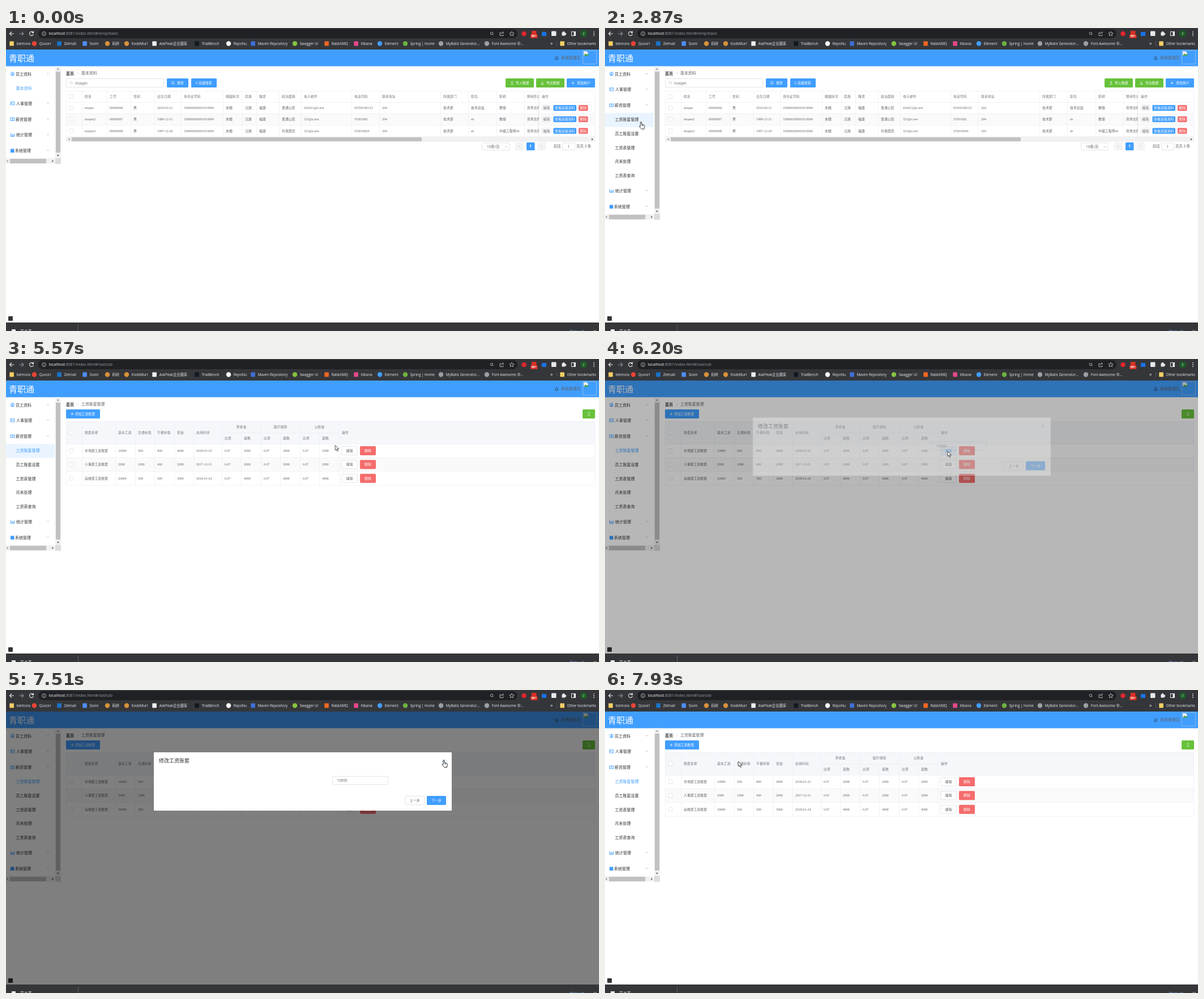
Recreate the animation shown at these times as an HTML page. Size 1047 by 535 pixels, loop 8 s.

```html
<!DOCTYPE html>
<html lang="zh-CN">
<head>
<meta charset="utf-8">
<title>员工管理</title>
<style>
html, body { margin: 0; width: 100%; height: 100%; overflow: hidden; background: #fff; }
svg { display: block; font-family: "Open Sans", "Noto Sans CJK SC", "Noto Sans CJK", sans-serif; }
.serif { font-family: "Liberation Serif", "Noto Sans CJK SC", "Noto Sans CJK", serif; }
text { white-space: pre; }

/* one loop is 8 s, so 1% is 80 ms */
.first { animation: first 8s step-end infinite; }
.second { animation: second 8s step-end infinite; }
@keyframes first { 0% { visibility: visible } 44.62% { visibility: hidden } }
@keyframes second { 0% { visibility: hidden } 44.62% { visibility: visible } }

.rise { animation: rise 8s ease infinite; }
.drop { animation: drop 8s ease infinite; }
@keyframes rise { 0%, 30% { transform: translateY(0) } 33.75%, 100% { transform: translateY(-24.7px) } }
@keyframes drop { 0%, 30% { transform: translateY(0) } 33.75%, 100% { transform: translateY(98.8px) } }
.shut, .open { transform-box: fill-box; transform-origin: center; animation: turn 8s ease infinite; }
.open { animation-name: unturn; }
@keyframes turn { 0%, 30% { transform: rotate(180deg) } 33.75%, 100% { transform: rotate(0) } }
@keyframes unturn { 0%, 30% { transform: rotate(0) } 33.75%, 100% { transform: rotate(180deg) } }

.over-hr { animation: over-hr 8s linear infinite; }
.over-pay { animation: over-pay 8s linear infinite; }
.over-sob { animation: over-sob 8s linear infinite; }
@keyframes over-hr { 0%, 17% { opacity: 0 } 18%, 25% { opacity: 1 } 26%, 100% { opacity: 0 } }
@keyframes over-pay { 0%, 14% { opacity: 0 } 14.5%, 17% { opacity: 1 } 18%, 25% { opacity: 0 } 26%, 31% { opacity: 1 } 32.5%, 100% { opacity: 0 } }
@keyframes over-sob { 0%, 32% { opacity: 0 } 33.5%, 76.5% { opacity: 1 } 77.4%, 100% { opacity: 0 } }
.sob { animation: sob 8s linear infinite; }
@keyframes sob { 0%, 45.6% { fill: #303133 } 48%, 100% { fill: #409eff } }
.check { animation: check 8s linear infinite; }
@keyframes check { 0%, 48% { fill: #e3effc } 51%, 100% { fill: #fff } }
.add { animation: add 8s linear infinite; }
@keyframes add { 0%, 52.7% { fill: #409eff } 53.6%, 56.8% { fill: #66b1ff } 57.6%, 100% { fill: #409eff } }
.del { animation: del 8s linear infinite; }
@keyframes del { 0%, 71.7% { fill: #f56c6c } 72.3%, 74% { fill: #f78989 } 75%, 100% { fill: #f56c6c } }
.edit { animation: edit 8s linear infinite; }
@keyframes edit { 0%, 74.8% { fill: #fff; stroke: #dcdfe6 } 75.6%, 77.6% { fill: #ecf5ff; stroke: #c6e2ff } 79%, 100% { fill: #fff; stroke: #dcdfe6 } }
.edit-text { animation: edit-text 8s linear infinite; }
@keyframes edit-text { 0%, 74.8% { fill: #606266 } 75.6%, 77.6% { fill: #409eff } 79%, 100% { fill: #606266 } }
.close { animation: close 8s step-end infinite; }
@keyframes close { 0% { stroke: #909399 } 91.5% { stroke: #409eff } 95% { stroke: #909399 } }

.shade { animation: shade 8s ease infinite; }
@keyframes shade { 0%, 76.69% { opacity: 0 } 79.19%, 93.94% { opacity: .5 } 96.5%, 100% { opacity: 0 } }
.dialog { animation: dialog 8s ease infinite; }
@keyframes dialog {
  0%, 76.69% { opacity: 0; transform: translateY(-10px) }
  80.44%, 93.94% { opacity: 1; transform: translateY(0) }
  97.35%, 100% { opacity: 0; transform: translateY(-10px) }
}

.cursor { animation: cursor 8s linear infinite; }
@keyframes cursor {
  0%, 4.87% { transform: translate(788px, 476px) }
  6.6% { transform: translate(480px, 355px) }
  8.37%, 10.87% { transform: translate(153px, 242px) }
  14% { transform: translate(86px, 178px) }
  17% { transform: translate(73px, 150px) }
  19.75%, 23.87% { transform: translate(69px, 135px) }
  27.37%, 33.5% { transform: translate(68px, 167px) }
  39.37%, 45.5% { transform: translate(57px, 164px) }
  49.75% { transform: translate(156px, 131px) }
  54.1%, 56.6% { transform: translate(139px, 97px) }
  61% { transform: translate(320px, 140px) }
  66.12% { transform: translate(563px, 177px) }
  69.6% { transform: translate(580.5px, 152px) }
  72.4% { transform: translate(634px, 165px) }
  75.6%, 78% { transform: translate(605px, 163px) }
  82% { transform: translate(630px, 177px) }
  86.4%, 88% { transform: translate(662px, 176px) }
  92%, 94.6% { transform: translate(773px, 124px) }
  97.4% { transform: translate(645px, 177px) }
  99.12%, 100% { transform: translate(235.5px, 126px) }
}
.arrow { animation: arrow 8s step-end infinite; }
.hand { animation: hand 8s step-end infinite; }
@keyframes arrow {
  0%, 14%, 52.7%, 71.8%, 91.3% { visibility: hidden }
  4.87%, 46.7%, 57%, 76.8%, 94.9% { visibility: visible }
}
@keyframes hand {
  0%, 46.7%, 57%, 76.8%, 94.9% { visibility: hidden }
  14%, 52.7%, 71.8%, 91.3% { visibility: visible }
}
</style>
</head>
<body>
<svg id="stage" width="1047" height="535" viewBox="0 0 1047 535"></svg>
<script>
const BLUE = '#409eff', GREEN = '#67c23a', RED = '#f56c6c';
const INK = '#606266', DARK = '#303133', MUTE = '#909399', EDGE = '#dcdfe6', LINE = '#ebeef5';

// y is the middle of the line of text
const text = (x, y, s, size = 5.9, fill = INK, more = '') =>
  `<text x="${x}" y="${y + size * .36}" font-size="${size}" fill="${fill}" ${more}>${s}</text>`;
const mid = (x, y, s, size, fill, more = '') => text(x, y, s, size, fill, `text-anchor="middle" ${more}`);
const rect = (x, y, w, h, fill, more = '') =>
  `<rect x="${x}" y="${y}" width="${w}" height="${h}" fill="${fill}" ${more}/>`;
const round = (x, y, w, h, fill, more = '') => rect(x, y, w, h, fill, `rx="1.6" ${more}`);
const frame = (x, y, w, h, more = '') => round(x + .5, y + .5, w - 1, h - 1, '#fff', `stroke="${EDGE}" stroke-width=".8" ${more}`);
const path = (d, stroke, width = .8, more = '') =>
  `<path d="${d}" fill="none" stroke="${stroke}" stroke-width="${width}" ${more}/>`;
const solid = (d, fill) => `<path d="${d}" fill="${fill}"/>`;
const dot = (x, y, r, fill, more = '') => `<circle cx="${x}" cy="${y}" r="${r}" fill="${fill}" ${more}/>`;
const ring = (x, y, r, stroke, width = .8) => dot(x, y, r, 'none', `stroke="${stroke}" stroke-width="${width}"`);
const group = (cls, ...parts) => `<g class="${cls}">${parts.join('')}</g>`;
const plus = (x, y) => path(`M${x - 2.5} ${y}h5M${x} ${y - 2.5}v5`, '#fff', .7);
const cross = (x, y, r, color, more) => path(`M${x - r} ${y - r}l${2 * r} ${2 * r}m0 ${-2 * r}l${-2 * r} ${2 * r}`, color, .8, more);
const down = (x, y, cls = '') => path(`M${x - 2} ${y - 1}l2 2 2-2`, MUTE, .6, `class="${cls}"`);
const lens = (x, y, color) => ring(x, y, 2.2, color, .7) + path(`M${x + 1.6} ${y + 1.6}l1.2 1.2`, color, .7);
const check = (y, more = '') => rect(112, y - 3.5, 7, 7, '#fff', `rx="1" stroke="${EDGE}" stroke-width=".7" ${more}`);

function bookmarks() {
  const items = [
    [10, 'belmora', '#f6cf65', 0], [50, 'Quoori', '#ea4335', 1], [94, 'Zelmail', '#1a73c9', 0],
    [139, 'Sovin', '#4e8df5', 0], [179, '码岭', '#d8913a', 1], [213, 'KodeMurl', '#d8913a', 1],
    [262, 'AskPeak企业题库', '#f1f1f1', 0], [337, 'TrialBench', '#101820', 0], [393, 'RepoNu', '#fff', 1],
    [436, 'Maven Repository', '#3f6fd8', 0], [510, 'Swagger UI', '#85c440', 1], [566, 'RabbitMQ', '#f26722', 0],
    [618, 'Kibana', '#e8478b', 0], [660, 'Element', '#409eff', 1], [705, 'Spring | Home', '#6db33f', 1],
    [768, 'MyBatis Generator...', '#9aa0a6', 1], [849, 'Font Awesome 中...', '#9aa0a6', 1],
    [982, 'Other bookmarks', '#f6cf65', 0]];
  return items.map(([x, name, color, disc]) =>
    (disc ? dot(x, 27.5, 4.2, color) : rect(x - 3.7, 23.6, 7.6, 7.8, color, 'rx=".6"')) +
    text(x + 8.7, 27.5, name, 6.25, '#e8eaed')).join('');
}

function browser() {
  const w = '#e8eaed', g = '#8b8f94', url = tail =>
    text(75.5, 10, `<tspan fill="#fff">localhost</tspan>:8081/index.html#/${tail}`, 6.85, '#9aa0a6');
  return rect(0, 0, 1047, 38, '#35363a') + rect(57, 2, 846, 16, '#202124', 'rx="8"') +
    path('M14 10H7M10 6.5L6.5 10l3.5 3.5', w, 1.1) + path('M23 10h7M27.500 6.500L31 10l-3.500 3.500', g, 1.1) +
    path('M47.600 7.500A3.500 3.500 0 1 0 48.500 10.500', w, 1.1) + solid('M49 5v4h-4z', w) +
    ring(67, 10, 3.5, w, .7) + path('M67 9.300v2.600M67 7.800v.8', w, .8) +
    group('first', url('emp/basic')) + group('second', url('sal/sob')) +
    lens(857.5, 9.5, w) + path('M874 8h-2v5.500h6v-2M874 11q.5-3 4-3M876.500 6l2 2-2 2', w, .7) +
    path('M893 6l1.200 2.700 2.900.3-2.200 1.900.7 2.900-2.600-1.500-2.600 1.500.7-2.900-2.200-1.900 2.900-.3z', w, .7) +
    dot(914.5, 10, 4.3, '#e0262d') + rect(928, 5, 8.5, 7, '#d93025') +
    rect(926, 11, 12.5, 7, '#d93025', 'rx="1.500"') + mid(932.2, 14.6, '99+', 5.2, '#fff', 'font-weight="700"') +
    rect(946, 7, 8, 7, '#1a73e8') + rect(963, 5.5, 8.5, 8.5, '#e8eaed', 'rx="1"') +
    rect(981.5, 7.5, 6, 6, w) + dot(984.5, 7.2, 1.4, w) + dot(988, 10.5, 1.4, w) +
    rect(998.5, 6.5, 7, 7, 'none', `stroke="${w}"`) + rect(1002.5, 6.5, 3, 7, w) +
    dot(1020, 10, 6.2, '#1d5b27') + mid(1020, 10, 'Z', 6, '#e8eaed') +
    [6.8, 10, 13.2].map(y => dot(1038, y, .9, w)).join('') +
    bookmarks() + text(961, 27, '»', 9, w) + rect(972, 23, .7, 9, '#5f6368');
}

const shelf = () => rect(0, 520, 1047, 15, '#35363a') + rect(127, 524, .8, 11, '#6b6d70') +
  rect(10, 532, 7, 3, '#e8eaed') + text(25, 536, '员工表', 6.9, '#fff') +
  text(995.5, 536, 'Show all', 6.6, '#8ab4f8') + cross(1040, 535.5, 2.3, '#e8eaed');

const header = () => rect(0, 38, 1047, 29.5, BLUE) + text(5, 53.5, '青职通', 15, '#fff') +
  path('M969.500 55h5.500M970.300 55v-2.500a2 2 0 0 1 4 0V55M971.500 56h1.500', DARK, .7) + text(980, 53, '系统管理员', 6.9, INK) +
  rect(1018.5, 40, 24, 23.5, 'none', 'stroke="#b9cbe0" stroke-width=".6"') +
  solid('M1020 41h5l3 3v5h-8z', '#e9eef5') + solid('M1020 49l3-4 2 2 3-2v4z', '#4ca64c');

function sidebar() {
  const icons = [
    y => ring(11.5, y, 3.2, BLUE, .8) + dot(11.5, y - .9, 1.2, BLUE) + solid(`M9.300 ${y + 2}q2.200-2.500 4.400 0l-2.200 1z`, BLUE),
    y => rect(8, y - 2.6, 7, 5.4, 'none', `stroke="${BLUE}" stroke-width=".8"`) + dot(10, y, 1.1, BLUE) + path(`M12 ${y - 1}h2m-2 2h2`, BLUE, .6),
    y => rect(8, y - 2.3, 7, 4.8, 'none', `stroke="${BLUE}" stroke-width=".9"`) + ring(11.5, y, 1.1, BLUE, .7),
    y => path(`M8.400 ${y - 3}v6h7M10.200 ${y + 2}v-2m1.600 2v-3.500m1.600 3.500v-2.500m1.500 2.500v-4`, BLUE, .9),
    y => rect(8, y - 3, 6.5, 6.5, BLUE)];
  const row = (i, y, x, name, cls) => icons[i](y) + text(x, y, name, 7, DARK) + down(74, y - .5, cls);
  const subs = ['员工账套设置', '工资表管理', '月末处理', '工资表查询'];
  const thumb = '#c1c1c1', track = '#f1f1f1', tip = '#505050';
  return rect(87, 67.5, 10, 285, track) + rect(88, 77, 8, 265, thumb) + solid('M89.800 73.500h4l-2-2.500z', '#8a8a8a') +
    row(0, 81, 17, '员工资料', 'shut') + text(17.5, 106, '基本资料', 7, BLUE) +
    group('rise',
      rect(0, 119, 87, 182, '#fff'),
      rect(0, 119.5, 86, 27.5, '#ecf5ff', 'class="over-hr"'), rect(0, 147.5, 86, 27, '#ecf5ff', 'class="over-pay"'),
      row(1, 133, 18, '人事管理'), row(2, 161, 17, '薪资管理', 'open'),
      rect(0, 174.7, 86, 24.7, '#e9f4ff', 'class="over-sob"'),
      text(17.5, 186.4, '工资账套管理', 7, DARK, 'class="sob"'),
      ...subs.map((s, i) => text(17.5, 211.1 + i * 24.7, s, 7, DARK))) +
    group('drop',
      rect(0, 175, 87, 170, '#fff'), rect(87, 220, 10, 10, track), rect(0, 239.5, 97, 115, '#fff'),
      row(3, 188.5, 18, '统计管理'), row(4, 216.5, 16, '系统管理'),
      solid('M89.800 224h4l-2 2.500z', tip),
      rect(0, 230, 87, 9.5, track), rect(7, 231, 64, 8, thumb), rect(87, 230, 10, 9.5, '#dcdcdc'),
      solid('M3.500 233v4l-2.500-2z', '#8a8a8a'), solid('M81.500 233v4l2.500-2z', tip));
}

const crumbs = name => text(106, 80, '首页', 7, DARK, 'font-weight="700"') +
  path('M126 78l2 2-2 2', '#c0c4cc', .7) + text(133, 80, name, 6.9);

const grid = (xs, top, bottom) => xs.map(x => rect(x, top, .7, bottom - top, LINE)).join('');
const cells = (xs, y, row, fill) => row.map((s, i) => text(xs[i] + 5, y, s, 5.9, fill)).join('');

function staff() {
  const xs = [134, 178, 220, 262, 309, 383, 417, 442, 482, 521, 610, 659, 767, 816, 866, 915];
  const head = '姓名 工号 性别 出生日期 身份证号码 婚姻状况 民族 籍贯 政治面貌 电子邮件 电话号码 联系地址 所属部门 职位 职称 聘用形式'.split(' ');
  const person = (name, no, born, party, mail, phone, post, title) => [name, no, '男', born, '330000200001010000',
    '未婚', '汉族', '福建', party, mail, phone, '204', '技术部', post, title, '劳务合同'];
  const people = [
    person('moqen', '00000066', '2010-03-31', '普通公民', '654321@z.test', '05550100123', '技术总监', '教授'),
    person('moqen2', '00000067', '1989-12-31', '普通公民', '321@z.test', '55501002', 'sb', '教授'),
    person('moqen3', '00000068', '1997-12-29', '共青团员', '321@z.test', '555010034', 'sb', '中级工程师66')];
  const ys = [141, 161, 181.5], tops = [111, 131, 151, 171.3, 191.5];
  const button = (x, w, color, s, tx) => round(x, 89, w, 16, color) + text(tx, 97.3, s, 5.9, '#fff', 'font-weight="500"');
  const tag = (x, y, w, color, s) => round(x, y - 5, w, 10.2, color) + mid(x + w / 2, y, s, 5.9, '#fff');
  const lines = () => tops.map(y => rect(106, y, 934, .7, LINE)).join('');
  return crumbs('基本资料') + frame(106, 89, 173, 16) + lens(115, 96.5, '#c0c4cc') + text(122, 97.3, 'moqen', 6.6) +
    button(284, 38, BLUE, '搜索', 302) + lens(294.5, 97, '#fff') +
    button(327, 45, BLUE, '高级搜索', 340) + path('M334.500 95l1.800 1.800 1.800-1.800m-3.600 2l1.800 1.800 1.800-1.800', '#fff', .7) +
    button(882, 50, GREEN, '导入数据', 900) + path('M891 99.500h5M893.500 98.500v-4m-1.800 1.800l1.800-1.800 1.800 1.800', '#fff', .7) +
    button(936, 50, GREEN, '导出数据', 954) + path('M944.500 99.500h5M947 94.500v4m-1.800-1.800l1.800 1.800 1.800-1.800', '#fff', .7) +
    button(990, 50, BLUE, '添加用户', 1008) + plus(1001, 97) +
    rect(106, 151, 934, 20.3, '#fafafa') + lines() + grid([106, ...xs], 111, 192) +
    group('serif', cells(xs, 121, head, '#73767c'), ...people.map((row, i) => cells(xs, ys[i], row))) +
    [121, ...ys].map(y => check(y)).join('') +
    rect(939, 111, 2, 81, '#000', 'opacity=".04"') + rect(941, 111, 99, 81, '#fff') + rect(941, 151, 99, 20.3, '#fafafa') +
    tops.map(y => rect(941, y, 99, .7, LINE)).join('') + grid([941, 1039.5], 111, 192) + text(946, 121, '操作', 5.9, '#73767c') +
    ys.map(y => frame(946, y - 5.3, 16.5, 10.6) + mid(954.2, y, '编辑', 5.9, INK) +
      tag(966.5, y, 40.5, BLUE, '查看高级资料') + tag(1011, y, 16.5, RED, '删除')).join('') +
    rect(106, 192, 934, 9, '#f1f1f1') + rect(116, 193, 618, 7, '#c1c1c1') +
    solid('M112.500 194.500v4l-2.500-2z', '#8a8a8a') + solid('M1034 194.500v4l2.500-2z', '#505050') +
    frame(840, 202.5, 49, 13.5) + text(849, 209.2, '10条/页', 6.4) + down(883, 209.5) +
    [[898.5, 1], [938.5, -1]].map(([x, d]) => round(x, 202, 15, 14, '#f4f4f5') +
      path(`M${x + 7.5 + d} 207l${-2 * d} 2 ${2 * d} 2`, '#c0c4cc', .7)).join('') +
    round(919, 202, 14.5, 14, BLUE) + mid(926.2, 209, '1', 6.4, '#fff', 'font-weight="700"') +
    text(967, 209, '前往', 6.4) + frame(982, 202.5, 23, 13.5) + mid(993.5, 209.2, '1', 6.4, INK) + text(1007, 209, '页共 3 条', 6.4);
}

function payroll() {
  const xs = [134, 193, 228, 262, 297, 331, 381, 415, 450, 484, 519, 553];
  const plain = '账套名称 基本工资 交通补助 午餐补助 奖金 启用时间'.split(' ');
  const groups = [[415.5, '养老金'], [484.5, '医疗保险'], [553.5, '公积金']];
  const set = (name, pay, ride, meal, bonus, date, base) =>
    [name, pay, ride, meal, bonus, date, ...Array(3).fill(['0.07', base]).flat()];
  const sets = [
    set('市场部工资账套', 10000, 500, 800, 4000, '2018-01-23', 2000),
    set('人事部工资账套', 2000, 1000, 400, 2000, '2017-12-31', 2000),
    set('运维部工资账套', 20000, 500, 500, 3000, '2018-01-24', 4000)];
  const ys = [162, 186.2, 210.7], grey = '#73767c';
  return crumbs('工资账套管理') + round(106, 89, 60, 16, BLUE, 'class="add"') + plus(117, 97) +
    text(122, 97.3, '添加工资账套', 5.9, '#fff', 'font-weight="500"') +
    round(1018, 89, 22, 16, GREEN) + path('M1027 96.200a2.200 2.200 0 0 1 4-.4m.2 2a2.200 2.200 0 0 1-4.200.4', '#fff', .8) +
    rect(106, 110, 934, 40, '#f5f7fa') + rect(106, 174, 934, 24.4, '#fafafa') +
    [110, 150, 174, 198.4, 222.7].map(y => rect(106, y, 934, .7, LINE)).join('') + rect(381, 130, 207, .7, LINE) +
    grid([106, ...xs.slice(0, 7), 450, 519, 588, 1039.5], 110, 223) + grid([415, 484, 553], 130, 223) +
    cells(xs, 130, plain, grey) + text(593, 130, '操作', 5.9, grey) +
    groups.map(([x, s]) => mid(x, 120, s, 5.9, grey)).join('') +
    cells(xs.slice(6), 140, ['比率', '基数', '比率', '基数', '比率', '基数'], grey) +
    group('serif', ...sets.map((row, i) => cells(xs, ys[i], row))) +
    check(130, 'class="check"') + ys.map(y => check(y)).join('') +
    ys.map((y, i) => frame(592.5, y - 8, 28, 16, i ? '' : 'class="edit"') +
      mid(606.5, y, '编辑', 5.9, INK, i ? '' : 'class="edit-text"') +
      round(625, y - 8, 28, 16, RED, i ? '' : 'class="del"') + mid(639, y, '删除', 5.9, '#fff', 'font-weight="500"')).join('');
}

const dialog = () => group('dialog',
  rect(261, 110, 526, 103, '#fff', 'rx="1"'), text(270, 125, '修改工资账套', 9, DARK),
  cross(772.5, 125, 2.2, MUTE, 'class="close"'),
  frame(576, 152, 99, 15.5), text(584.5, 160, '10000', 6.4),
  frame(704.5, 187, 34.5, 16), mid(721.7, 195, '上一步', 5.9, INK),
  round(743, 187, 34, 16, BLUE), mid(760, 195, '下一步', 5.9, '#fff', 'font-weight="500"'));

const cursor = () => group('cursor',
  group('arrow', '<path d="M0 0V8.800L2 7 3.500 10.500 5 9.900 3.600 6.500H6.300Z" fill="#fff" stroke="#000" stroke-width=".7"/>'),
  group('hand', '<path transform="translate(-3.200 -.5)" d="M2.300 8V1.400a1 1 0 0 1 2 0V5l3.700.8q1.700.4 1.500 2.200L8.700 13H4.200L.6 9q-.6-1.300.5-1.500z" fill="#fff" stroke="#000" stroke-width=".8"/>' +
    path('M2.800 5v2.500M2.800 4.500v3.200', '#000', .5)));

document.getElementById('stage').innerHTML = [
  rect(0, 0, 1047, 535, '#fff'), header(), sidebar(),
  group('first', staff()), group('second', payroll()),
  rect(4, 509, 8, 8, '#333', 'rx="1"'),
  rect(0, 38, 1047, 482, '#000', 'class="shade"'),
  dialog(), browser(), shelf(), cursor()
].join('');
</script>
</body>
</html>
```
